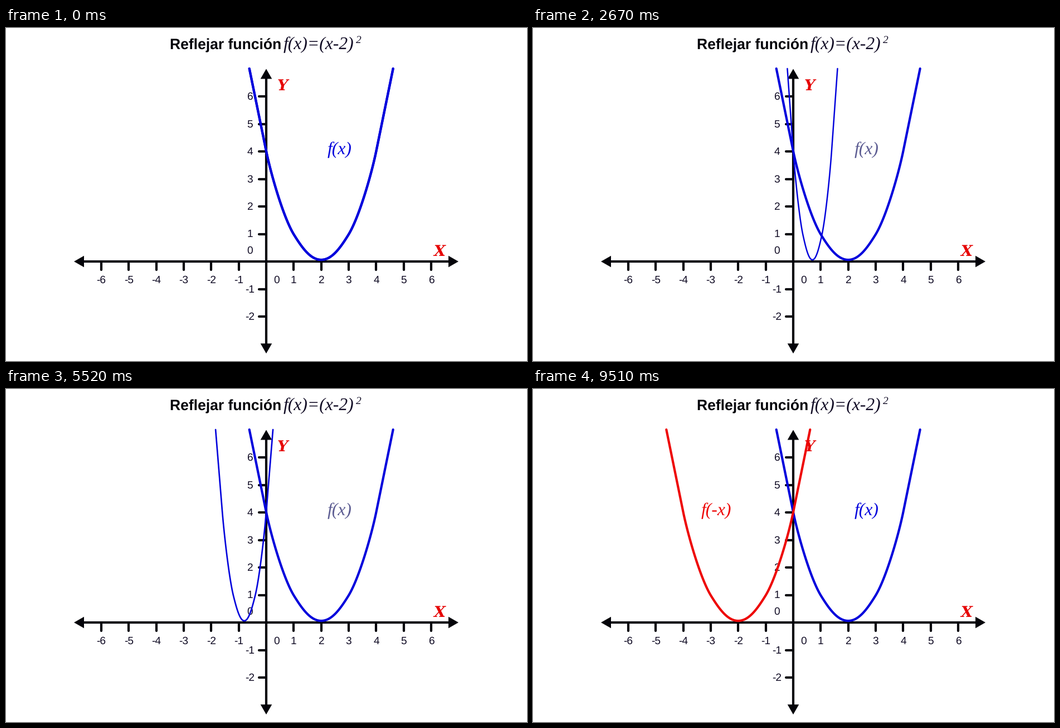
A matplotlib script that plays this animation: 935x599 px, repeating every 9.54 s.

```python
import numpy as np
import matplotlib.pyplot as plt
from matplotlib.animation import FuncAnimation
from matplotlib.colors import to_rgb

W, H, DPI = 935, 599, 100
STEP, FRAMES = 30, 318
PT = 72 / DPI                      # points per pixel
CX, CY = 467, 420                  # where the axes cross
UX, UY = 49.35, 49.5               # pixels per unit
INK, BLACK = "#100b24", "#04040a"
BLUE, DIM, RED = "#0202dc", "#5c5c92", "#ee0606"
LINE = 4.2

plt.rcParams["text.hinting"] = "none"
fig = plt.figure(figsize=(W / DPI, H / DPI), dpi=DPI, facecolor="white")
ax = fig.add_axes([0, 0, 1, 1])
ax.set_xlim(0, W)
ax.set_ylim(H, 0)
ax.axis("off")


def text(x, y, s, size, color=INK, font="Liberation Sans", **kw):
    return ax.text(x, y, s, fontsize=size * PT, color=color, family=font,
                   va="baseline", **kw)


def math(x, y, s, size=31.6, color=INK):
    return text(x, y, s, size, color, "Liberation Serif", style="italic", zorder=2)


def number(x, y, n):
    text(x, y, str(n), 19.2, ha="center")


def stroke(xs, ys, width=LINE, color=BLACK, zorder=3):
    return ax.plot(xs, ys, color=color, lw=width * PT, zorder=zorder,
                   solid_capstyle="round", solid_joinstyle="round")[0]


def arrow(x, y, dx, dy, length=18, half=10.3):
    bx, by = x - dx * length, y - dy * length
    ax.fill([x, bx + dy * half, bx - dy * half],
            [y, by + dx * half, by - dx * half], color=BLACK, lw=0, zorder=3)


def bezier(*pts):
    a, b, c, d = np.array(pts, float)
    t = np.linspace(0, 1, 30)[:, None]
    return a*(1-t)**3 + 3*b*t*(1-t)**2 + 3*c*t*t*(1-t) + d*t**3


def parabola():
    """Offsets from the vertical axis and heights of the whole curve."""
    half = np.vstack([
        bezier((0, 417), (19, 417), (34, 396), (49.4, 371)),
        bezier((49.4, 371), (68, 340), (90, 264), (98.8, 221)),
        [(129, 73)],
    ])
    dx = np.concatenate([-half[::-1, 0], half[:, 0]])
    return 2 * UX + dx, np.concatenate([half[::-1, 1], half[:, 1]])


def mix(a, b, k):
    k = min(max(k, 0), 1)
    return tuple((1 - k) * np.array(to_rgb(a)) + k * np.array(to_rgb(b)))


# title
text(294, 38, "Reflejar función", 26.5, BLACK, weight="bold")
math(498, 38, "f(x)=(x-2)")
math(628, 27, "2", 19.5)

# axes, ticks and numbers
stroke([130, 803], [CY, CY])
stroke([CX, CX], [82, 577])
arrow(122, CY, -1, 0)
arrow(812, CY, 1, 0)
arrow(CX, 73.5, 0, -1)
arrow(CX, 585.5, 0, 1)
for n in range(-6, 7):
    if n:
        x = CX + n * UX
        stroke([x, x], [CY, 434.5])
        number(x, 459, n)
    if n and n >= -2:
        y = CY - n * UY
        stroke([453.5, CX], [y, y])
        number(437.5, y + 6, n)
number(486, 459, 0)
number(437.5, 406, 0)
for x, y, s in ((778, 410, "X"), (496.5, 112, "Y")):
    text(x, y, s, 27, "#e60404", "DejaVu Serif", weight="bold",
         style="italic", ha="center")

# curves and their names
px, py = parabola()
stroke(CX + px, py, LINE, BLUE, 5)
mirror = stroke(CX + px, py, LINE, BLUE, 6)
name = math(576.5, 227.5, "f(x)", color=BLUE)
mirror_name = math(302, 227.5, "f(-x)", color=RED)


def update(i):
    t = i * STEP
    # horizontal scale of the copy, with a short rest near the axis
    s = np.interp(t, [327, 3768, 3925, 7683], [1, 0.044, 0.044, -1])
    mirror.set_xdata(CX + s * px)
    mirror.set_linewidth(max(LINE * np.sqrt(abs(s)), 1.5) * PT)
    mirror.set_color(RED if t >= 7710 else BLUE)
    name.set_color(mix(BLUE, DIM, t / 300) if t < 8700
                   else mix(DIM, BLUE, (t - 8700) / 480))
    mirror_name.set_alpha(float(np.clip((t - 7740) / 630, 0, 1)))
    return mirror, name, mirror_name


anim = FuncAnimation(fig, update, frames=FRAMES, interval=STEP, repeat=True,
                     repeat_delay=0, blit=False)
plt.show()
```
